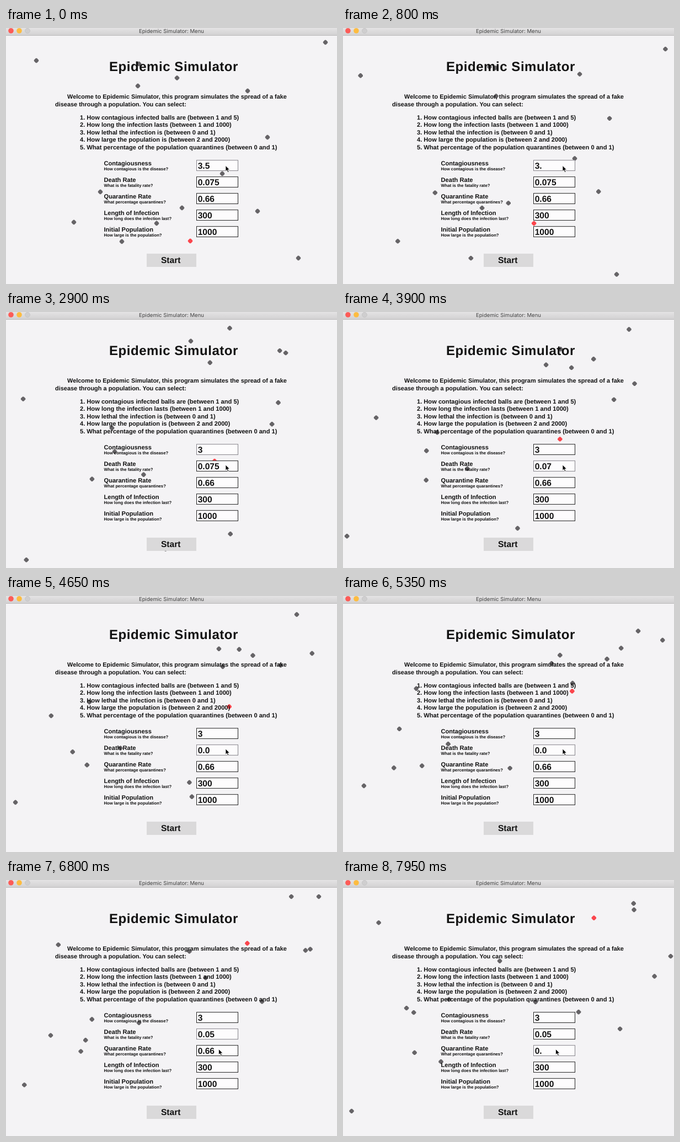
An HTML page for the animation above (8 s loop, 600x464 px).

```html
<!DOCTYPE html>
<html lang="en">
<head>
<meta charset="utf-8">
<title>Epidemic Simulator: Menu</title>
<style>
  html, body { margin: 0; width: 100%; height: 100%; overflow: hidden; background: #f4f3f5; }
  svg { display: block; width: 600px; height: 464px; }
  text { font: bold 11.12px "Liberation Sans", Arial, sans-serif; fill: #111; white-space: pre; text-rendering: geometricPrecision; }
  .title { font-size: 24px; letter-spacing: .55px; }
  .intro { font-size: 10.95px; }
  .hint { font-size: 7.7px; }
  .value { font-size: 15.6px; }
  .bar { font: 9.6px Inter, sans-serif; fill: #444; }
  .mid { text-anchor: middle; }
  .box { fill: #fdfcfd; stroke: #222; }
  .box.active { stroke: #85838a; }
  .box.invalid { stroke: #f0646a; }
  .ball { fill: #666467; }
  .ball:last-child { fill: #fb454c; }
</style>
</head>
<body>
<svg viewBox="0 0 600 464">
  <defs>
    <linearGradient id="chrome" x2="0" y2="1">
      <stop stop-color="#e4e3e4"/><stop offset="1" stop-color="#d2d1d2"/>
    </linearGradient>
  </defs>
  <rect width="600" height="464" fill="#f4f3f5"/>
  <g id="balls"></g>
  <g id="form"></g>
  <rect width="600" height="13" fill="url(#chrome)"/>
  <rect y="13" width="600" height="1" fill="#bcbbbc"/>
  <circle cx="9" cy="5" r="4.8" fill="#fc5b57"/>
  <circle cx="24" cy="5" r="4.8" fill="#fdbc40"/>
  <circle cx="39" cy="5" r="4.5" fill="#cfcecf" stroke="#bdbcbd" stroke-width=".6"/>
  <text class="bar mid" x="300" y="9.2">Epidemic Simulator: Menu</text>
  <path id="cursor" d="M0 0V10.3L2.4 8.1L4.1 12L5.9 11.2L4.2 7.4H7.4Z" fill="#000" stroke="#fff" stroke-width=".8"/>
</svg>
<script>
const LOOP = 8000, TICK = 50, ROW = 30;
const WALLS = { left: 1, right: 598.5, top: 16.5, bottom: 463 };

// Each ball runs straight and bounces: start x, y and px per second. The last is infected.
const BALLS = [
  [55, 59, -29, 34], [241, 65, 44.4, 9.2], [310, 90.5, -40.7, 41.3], [239, 105, 33.1, -43],
  [438, 114, -11.2, -38], [579, 26, 42, 15.2], [474, 198, 11.4, -42.7], [392, 264, 35, -34.4],
  [171, 297, -5.2, 2], [319, 326, -24, -10.8], [456, 332, 9, -44.4], [273, 354, -26.2, -34.8],
  [123, 352, -29.7, 43], [210, 387, 27.3, 37.7], [530, 417, -42.5, 36.8], [334, 386, 15.2, -39.9]
];

const INTRO = ["Welcome to Epidemic Simulator, this program simulates the spread of a fake",
  "disease through a population. You can select:"];
const OPTIONS = [
  "1. How contagious infected balls are (between 1 and 5)",
  "2. How long the infection lasts (between 1 and 1000)",
  "3. How lethal the infection is (between 0 and 1)",
  "4. How large the population is (between 2 and 2000)",
  "5. What percentage of the population quarantines (between 0 and 1)"
];

// keys are pressed one per gap from start on; "<" is backspace.
const FIELDS = [
  { name: "Contagiousness", hint: "How contagious is the disease?", value: "3.5", start: 800, gap: 300, keys: "<<<3" },
  { name: "Death Rate", hint: "What is the fatality rate?", value: "0.075", start: 3700, gap: 900, keys: "<<5" },
  { name: "Quarantine Rate", hint: "What percentage quarantines?", value: "0.66", start: 7450, gap: 250, keys: "<<" },
  { name: "Length of Infection", hint: "How long does the infection last?", value: "300" },
  { name: "Initial Population", hint: "How large is the population?", value: "1000" }
];
const FOCUS_LEAD = 600;
const edited = FIELDS.filter(field => field.keys);

const byId = id => document.getElementById(id);

function add(parent, tag, attrs, text = "") {
  const node = document.createElementNS("http://www.w3.org/2000/svg", tag);
  for (const key in attrs) node.setAttribute(key, attrs[key]);
  node.textContent = text;
  return parent.appendChild(node);
}

const form = byId("form");
const label = (x, y, text, cls = "") => add(form, "text", { x, y, class: cls }, text);

label(304, 78.3, "Epidemic Simulator", "title mid");
INTRO.forEach((text, i) => label(111 - i * 22, 128.2 + i * 13.6, text, "intro"));
OPTIONS.forEach((text, i) => label(134, 165.7 + i * 13.55, text));
FIELDS.forEach((field, i) => {
  const y = i * ROW;
  label(177.5, 248.9 + y, field.name);
  label(177.5, 258.2 + y, field.hint, "hint");
  field.box = add(form, "rect", { x: 345.5, y: 239.7 + y, width: 75, height: 18.9 });
  field.text = label(347.7, 254.9 + y, "", "value");
});
add(form, "rect", { x: 255, y: 409, width: 90, height: 24, fill: "#dad9da" });
label(298.7, 426.2, "Start", "value mid");

const dots = BALLS.map(() =>
  add(byId("balls"), "path", { class: "ball", d: "M4.2-1V1L1 4.2H-1L-4.2 1V-1L-1-4.2H1Z" }));

function bounce(p, low, high) {
  const span = high - low;
  const q = (((p - low) % (2 * span)) + 2 * span) % (2 * span);
  return low + Math.min(q, 2 * span - q);
}

function typed({ value, start, gap, keys = "" }, t) {
  const count = t < start ? 0 : Math.floor((t - start) / gap) + 1;
  return [...keys.slice(0, count)].reduce((s, key) => key === "<" ? s.slice(0, -1) : s + key, value);
}

function glide(t, start, duration) {
  const u = Math.min(1, Math.max(0, (t - start) / duration));
  return u * u * (3 - 2 * u);
}

function render(now) {
  const t = Math.floor((now % LOOP) / TICK) * TICK, s = t / 1000;
  BALLS.forEach(([x, y, vx, vy], i) => {
    const px = bounce(x + vx * s, WALLS.left, WALLS.right);
    const py = bounce(y + vy * s, WALLS.top, WALLS.bottom);
    dots[i].setAttribute("transform", `translate(${px} ${py})`);
  });

  const focused = edited.filter((field, i) => i === 0 || t >= field.start - FOCUS_LEAD).pop();
  for (const field of FIELDS) {
    const text = typed(field, t);
    field.text.textContent = text;
    field.box.setAttribute("class", "box" + (text === "" ? " invalid" : field === focused ? " active" : ""));
  }

  const first = glide(t, 2350, 350), second = glide(t, 6150, 400);
  byId("cursor").setAttribute("transform",
    `translate(${398 - 12.5 * second} ${249.5 + 27.5 * first + 29.5 * second})`);
}

function loop() {
  render(performance.now());
  requestAnimationFrame(loop);
}
loop();
</script>
</body>
</html>
```
